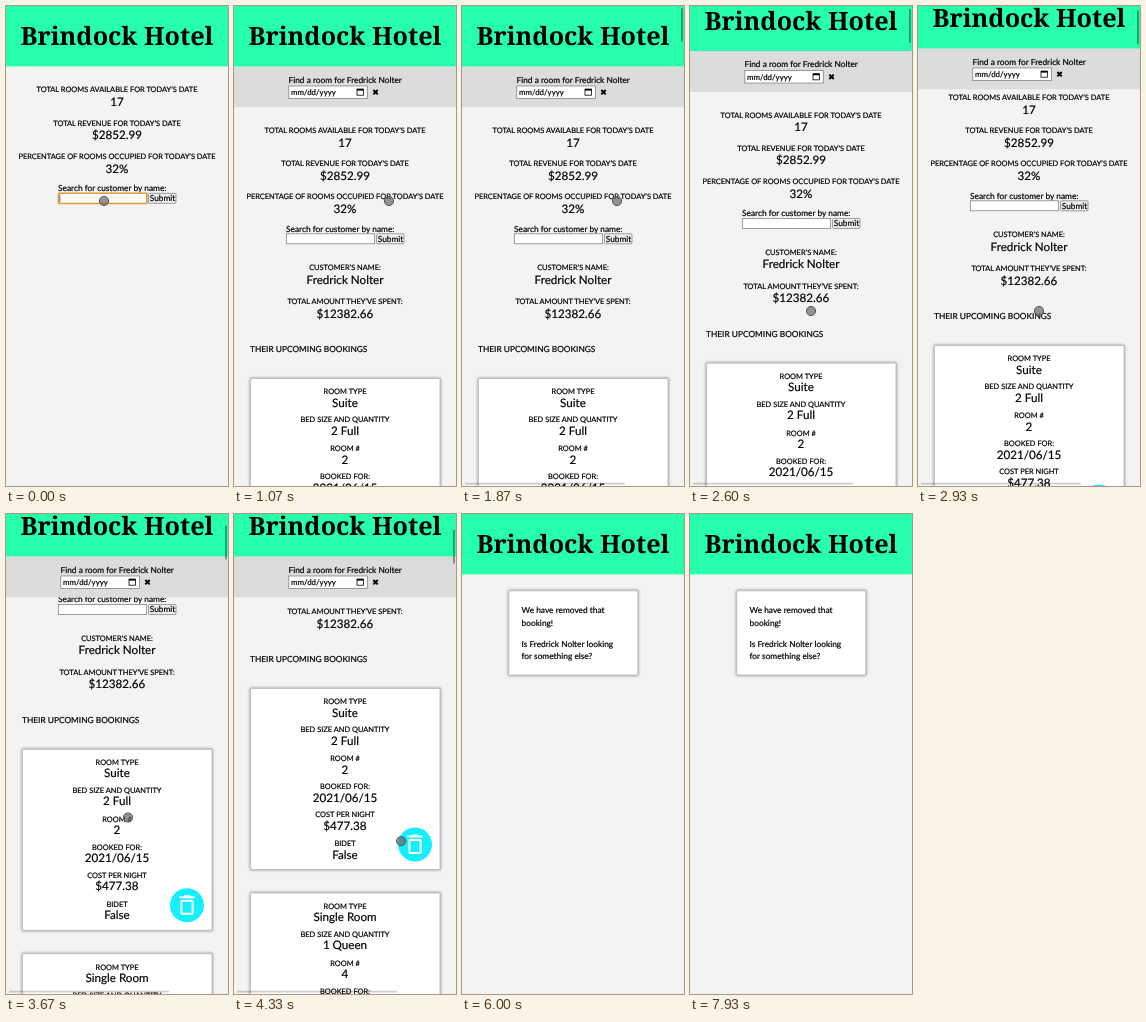
An HTML page that plays this animation: 222x480 px, repeating every 8 s.

```html
<!DOCTYPE html>
<html lang="en">
<head>
<meta charset="utf-8">
<title>Hotel bookings</title>
<style>
  html, body { margin: 0; width: 100%; height: 100%; overflow: hidden; background: #f3f3f3; }
  svg { display: block; width: 222px; height: 480px; font-family: Lato, sans-serif; }
  text { fill: #000; stroke: #000; stroke-width: .2; white-space: pre; text-rendering: geometricPrecision; }
  .title { font: bold 25.2px "Noto Serif", serif; stroke: none; }
  .label { font-size: 7.45px; }
  .value { font-size: 11.65px; }
  .body { font-size: 8.35px; }
  .field { font-size: 7.9px; }
  .mid { text-anchor: middle; }
  .card { fill: #fff; stroke: #c2c2c2; stroke-width: 1; filter: drop-shadow(0 0 1.5px rgba(0,0,0,.45)); }
  .box { stroke: #767676; stroke-width: .7; }
</style>
</head>
<body>
<svg id="stage" viewBox="0 0 222 480"></svg>
<script>
const LOOP = 8000;
const GUEST = 'Fredrick Nolter';
const SUBMIT_AT = 930, REMOVE_AT = 4560;
const HEADER_HEIGHT = 60.4, HEADER_SLIDE = 18;

const text = (x, y, cls, s) => `<text x="${x}" y="${y}" class="${cls}">${s}</text>`;
const rect = (x, y, w, h, attrs) => `<rect x="${x}" y="${y}" width="${w}" height="${h}" ${attrs}/>`;
const group = (id, inner) => `<g id="${id}">${inner}</g>`;

// A small caption with its larger value below; y is the caption's middle.
const pair = (y, label, value, gap = 12.5) =>
  text(111, y + 2.9, 'label mid', label) + text(111, y + gap + 4, 'value mid', value);

const CARD_ROWS = [13, 41, 70, 98, 126, 155];
const CARD_LABELS = ['ROOM TYPE', 'BED SIZE AND QUANTITY', 'ROOM #', 'BOOKED FOR:', 'COST PER NIGHT', 'BIDET'];

const trash = y => `
  <g transform="translate(181 ${y})">
    <circle r="17" fill="#16effb"/>
    <g fill="none" stroke="#fff" stroke-width="2">
      <rect x="-5.6" y="-4.4" width="11.2" height="13" rx="1"/>
      <path d="M-7.6 -7.9H7.6M-3 -9.1H3"/>
    </g>
  </g>`;

const card = (y, values) => rect(16.5, y, 189.5, 181, 'class="card"') +
  values.map((v, i) => pair(y + CARD_ROWS[i], CARD_LABELS[i], v, 11)).join('') +
  trash(y + 156);

const summary =
  pair(83.5, 'TOTAL ROOMS AVAILABLE FOR TODAY’S DATE', '17') +
  pair(116.8, 'TOTAL REVENUE FOR TODAY’S DATE', '$2852.99') +
  pair(150, 'PERCENTAGE OF ROOMS OCCUPIED FOR TODAY’S DATE', '32%') +
  text(52, 185, 'body', 'Search for customer by name:') +
  rect(52.3, 187.3, 88.4, 10, 'class="box" fill="#fff"') +
  group('focus', rect(52.5, 187.3, 88.5, 10.2, 'fill="none" stroke="#e99a2c" stroke-width="1.4" rx=".6"') +
    rect(53.6, 188.7, .6, 7.6, 'id="caret" fill="#000"')) +
  '<text id="typed" x="54" y="195" class="field"></text>' +
  rect(142.6, 187.3, 27.4, 10, 'class="box" fill="#efefef" rx="1"') +
  text(156.5, 195, 'body mid', 'Submit');

const results =
  pair(261, 'CUSTOMER’S NAME:', GUEST) +
  pair(295, 'TOTAL AMOUNT THEY’VE SPENT:', '$12382.66') +
  text(16, 346, 'body', 'THEIR UPCOMING BOOKINGS') +
  card(372.5, ['Suite', '2 Full', '2', '2021/06/15', '$477.38', 'False']) +
  card(577, ['Single Room', '1 Queen', '4', '']);

const bar = rect(0, 60, 222, 41.3, 'fill="#dbdcdc"') +
  text(54.5, 76.8, 'body', 'Find a room for ' + GUEST) +
  rect(54.8, 80, 78.5, 12.4, 'class="box" fill="#fff"') +
  text(57, 89, 'field', 'mm/dd/yyyy') +
  rect(123, 83.2, 6.4, 6, 'fill="none" stroke="#000" stroke-width=".8"') +
  rect(123, 82.8, 6.4, 1.8, 'fill="#000"') +
  '<path d="M139.3 84L143.7 88.4M143.7 84L139.3 88.4" stroke="#000" stroke-width="1.9"/>';

const message = rect(46.8, 76.8, 129, 84.2, 'class="card"') +
  ['We have removed that', 'booking!', `Is ${GUEST} looking`, 'for something else?']
    .map((s, i) => text(59.5, [99, 111.5, 132.5, 144.7][i], 'body', s)).join('');

document.getElementById('stage').innerHTML =
  rect(0, 0, 222, 480, 'fill="#f3f3f3"') +
  group('page', group('summary', summary) + group('results', results)) +
  group('message', message) +
  group('top', group('bar', bar) + rect(0, 0, 222, HEADER_HEIGHT, 'fill="#27ffac"') +
    text(111, 39.2, 'title mid', 'Brindock Hotel')) +
  group('thumbs', rect(3, 476.8, 160, 1.8, 'rx=".9" fill="#000" fill-opacity=".2"') +
    '<rect id="thumb" x="219" y="2" width="1.8" height="34" rx=".9" fill="#000" fill-opacity=".4"/>') +
  '<circle id="pointer" r="4.6" fill="#666" fill-opacity=".7" stroke="#555" stroke-width="1"/>';

const el = {};
document.querySelectorAll('[id]').forEach(n => el[n.id] = n);

// Rows of [time, ...values], eased out towards each row.
const SCROLL = [[2480, 0], [2930, 33], [3040, 33], [3870, 143.6], [3900, 143.6], [4330, 198]];
const POINTER = [
  [0, 98, 195, 1], [580, 98, 195, 1], [870, 155, 195, 1], [1900, 155, 195, 1],
  [2470, 121, 305, 1], [3070, 121, 305, 1], [3670, 122, 303.5, 1], [3900, 122, 303.5, 1],
  [4330, 167, 327, 1], [4480, 176, 336, 1], [5780, 176, 336, 1], [6000, 190, 336, 0]
];
const THUMBS = [[1650, 0], [1870, 1]];

function at(track, t) {
  const next = track.findIndex(row => row[0] > t);
  if (next < 0) return track[track.length - 1].slice(1);
  if (next === 0) return track[0].slice(1);
  const a = track[next - 1], b = track[next];
  const u = 1 - (1 - (t - a[0]) / (b[0] - a[0])) ** 2;
  return a.slice(1).map((v, i) => v + (b[i + 1] - v) * u);
}

const show = (node, on) => node.setAttribute('visibility', on ? 'visible' : 'hidden');
const move = (node, x, y) => node.setAttribute('transform', `translate(${x} ${y})`);

function draw(t) {
  const removed = t >= REMOVE_AT;
  const found = t >= SUBMIT_AT && !removed;
  const [scroll] = removed ? [0] : at(SCROLL, t);
  const [x, y, alpha] = at(POINTER, t);
  const letters = Math.max(0, Math.min(GUEST.length, Math.floor((t - 100) / 35)));

  show(el.summary, !removed);
  show(el.results, found);
  show(el.bar, found);
  show(el.message, removed);
  show(el.focus, t < SUBMIT_AT);
  show(el.caret, letters === 0 && t < SUBMIT_AT);
  el.typed.textContent = t < SUBMIT_AT ? GUEST.slice(0, letters) : '';

  move(el.page, 0, -scroll);
  move(el.summary, 0, found ? 40.5 : 0);
  move(el.top, 0, -Math.min(scroll, HEADER_SLIDE));
  move(el.thumb, 0, scroll * 0.07);
  el.thumbs.setAttribute('opacity', found ? at(THUMBS, t)[0] : 0);
  move(el.pointer, x, y);
  el.pointer.setAttribute('opacity', alpha);
}

const start = performance.now();
function tick() {
  draw((performance.now() - start) % LOOP);
  requestAnimationFrame(tick);
}
tick();
</script>
</body>
</html>
```
